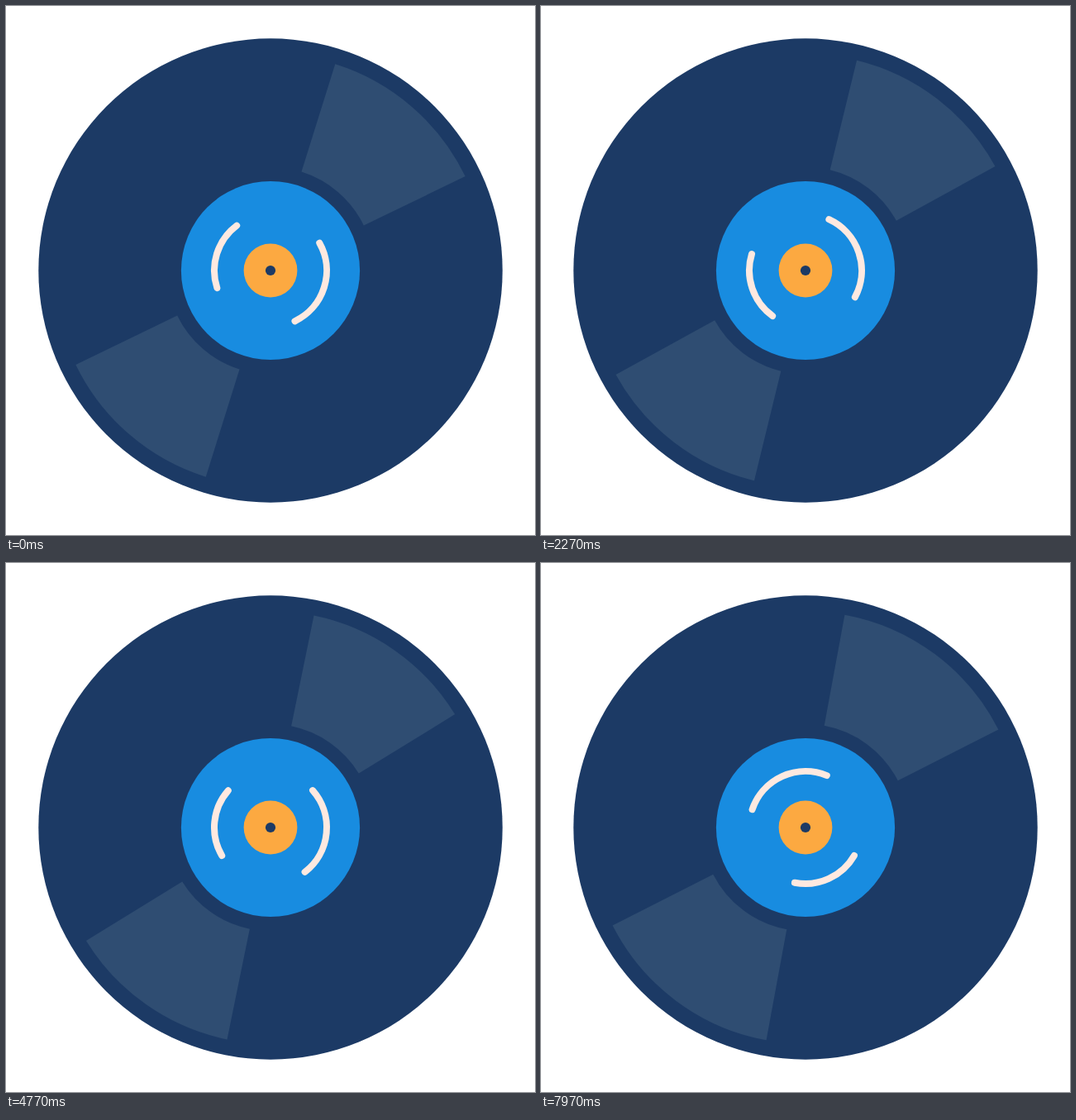
Animation of 640 by 640 pixels, one loop 8 s. Source, as an HTML page:

```html
<!DOCTYPE html>
<html lang="en">
<head>
<meta charset="utf-8">
<title>Spinning record</title>
<style>
  html, body { margin: 0; width: 100%; height: 100%; overflow: hidden; background: #fff; }
  svg { display: block; width: 100%; height: 100%; }
  path { fill: none; }
  .shine { stroke: #2f4d72; stroke-width: 136.4; }
  .mark { stroke: #fee9e0; stroke-width: 8; stroke-linecap: round; }
</style>
</head>
<body>
<svg viewBox="-320 -320 640 640">
  <circle r="280.7" fill="#1c3a65"/>
  <path class="shine" id="shineA"/>
  <path class="shine" id="shineB"/>
  <circle r="108.1" fill="#188ce0"/>
  <g id="marks">
    <path class="mark" id="markLong"/>
    <path class="mark" id="markShort"/>
  </g>
  <circle r="32.4" fill="#fca941"/>
  <circle r="6.1" fill="#1c3a65"/>
</svg>
<script>
const LOOP = 8000;
const SPIN = 30;                              // steps per turn of the label
const SWAY = [-49.2, -55, -52.45, -49.2];     // shine direction, one key per turn
const SPREAD = [46.8, 53.9];                  // narrowest and widest shine

const byId = id => document.getElementById(id);
const shineA = byId('shineA'), shineB = byId('shineB'), marks = byId('marks');

const ease = x => x * x * (3 - 2 * x);
const mix = (a, b, x) => a + (b - a) * x;

function arc(radius, middle, span) {
  const point = deg => {
    const a = deg * Math.PI / 180;
    return `${(radius * Math.cos(a)).toFixed(3)} ${(radius * Math.sin(a)).toFixed(3)}`;
  };
  return `M${point(middle - span / 2)}A${radius} ${radius} 0 0 1 ${point(middle + span / 2)}`;
}

// Motion at 25 steps a second, shown on a 30 Hz clock with 10 ms rounding.
function stepAt(ms) {
  const tick = Math.floor((ms * 3 + 10.5) / 100);
  return Math.min(199, Math.ceil((tick * 5 - 3) / 6));
}

function draw(step) {
  const turn = Math.floor(step / SPIN) % 3;
  const phase = step % SPIN / SPIN;
  const middle = mix(SWAY[turn], SWAY[turn + 1], ease(phase));
  const span = mix(...SPREAD, ease(1 - Math.abs(1 - 2 * phase)));
  shineA.setAttribute('d', arc(193.5, middle, span));
  shineB.setAttribute('d', arc(193.5, middle + 180, span));
  marks.setAttribute('transform', `rotate(${step * 360 / SPIN})`);
}

byId('markLong').setAttribute('d', arc(68, 17.5, 93.6));
byId('markShort').setAttribute('d', arc(68, 197.5, 71.2));

const start = performance.now();
function frame() {
  draw(stepAt((performance.now() - start) % LOOP));
  requestAnimationFrame(frame);
}
frame();
</script>
</body>
</html>
```
